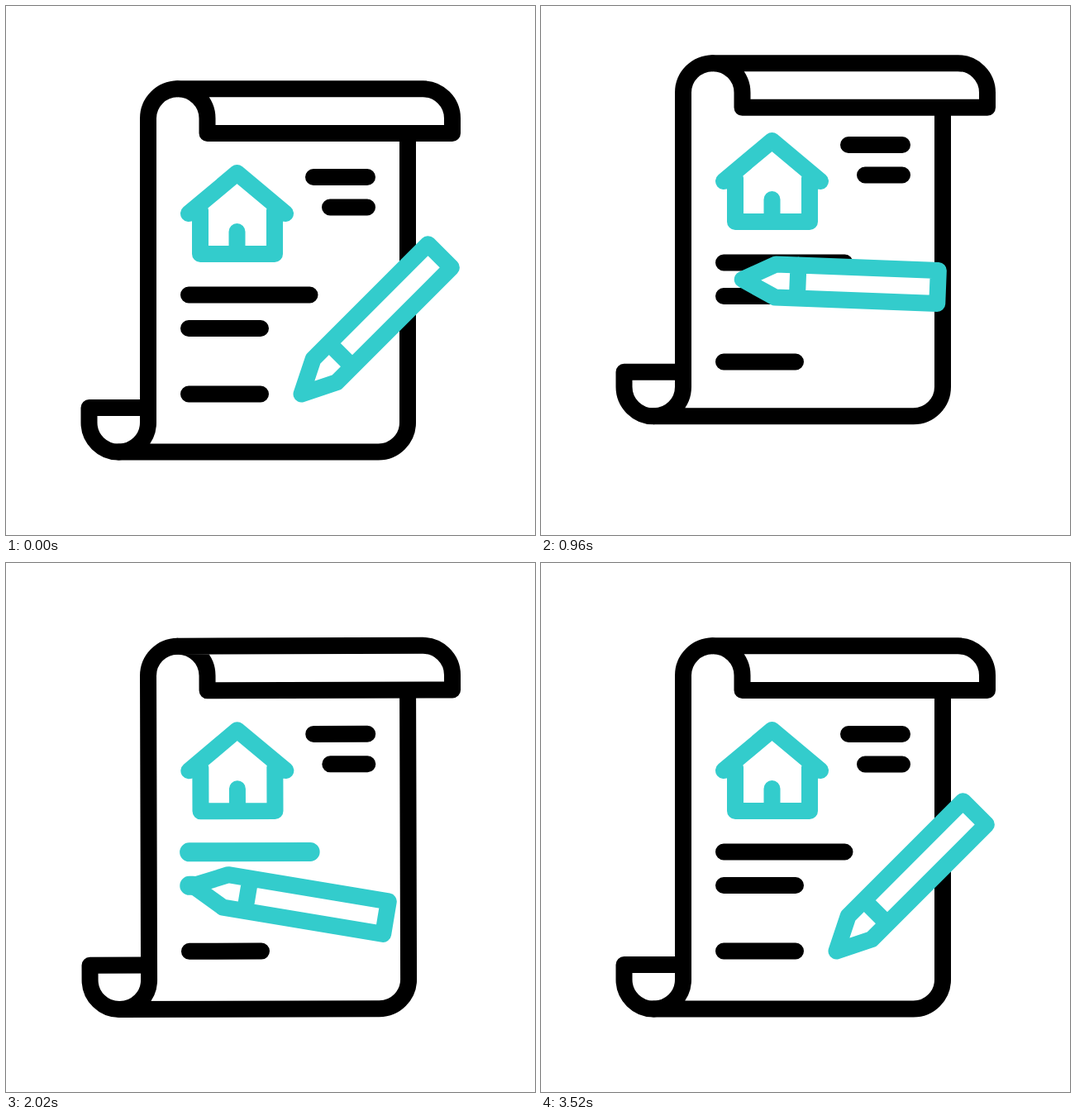
These frames come from a looping animation (640x640 px, 3.6 s). An HTML page:

```html
<!DOCTYPE html>
<html lang="en">
<head>
<meta charset="utf-8">
<title>House contract</title>
<style>
  html, body { margin: 0; width: 100%; height: 100%; overflow: hidden; background: #fff; }
  svg { display: block; width: 100%; height: 100%; }
  .ink, .teal { fill: none; stroke: #000; stroke-width: 20; stroke-linecap: round; stroke-linejoin: round; }
  .teal { stroke: #3cc; }
  .mark { stroke-width: 23; }
  .solid { fill: #fff; }
</style>
</head>
<body>
<svg viewBox="0 0 640 640">
  <g id="page">
    <path id="sheet" class="ink"/>
    <path id="curl" class="ink"/>
    <g id="content">
      <path class="teal" d="M235 247V300H325V247M221 251L279.5 202L338 251M279.5 273V300"/>
      <path class="ink" d="M372 207H437M392 243.5H437M221 349.5H367.5M221 390H308M221 469.5H308"/>
      <path class="teal mark"/>
      <path class="teal mark"/>
      <path class="teal mark"/>
    </g>
    <path id="roll" class="ink solid"
      d="M207.5 100.3A35.7 35.7 0 0 1 243.5 136V154H540V136A35.7 35.7 0 0 0 504 100.3Z"/>
    <path id="pencil" class="teal solid" d="M0 0L40 -20H236.5V20H40ZM67 -20V20"/>
  </g>
</svg>
<script>
const LOOP = 3600, STEP = 20, LEFT = 221;
const REST = { x: 357.5, y: 469.5, tilt: -45 };

// The pencil reaches each line at `from` and leaves it at `to`.
const lines = [
  { y: 349.5, end: 367.5, from: 1089, to: 1690, tilt: 14.4, leave: { x: 367.5, tilt: 20 }, ease: linear },
  { y: 390, end: 308, from: 2000, to: 2390, tilt: 11.3, leave: { x: 308, tilt: -21.5 }, ease: linear },
  { y: 469.5, end: 308, from: 2800, to: 3200, tilt: -23.4, leave: REST, ease: smooth }
];

const $ = id => document.getElementById(id);
const marks = document.querySelectorAll('.mark');

function linear(u) { return u; }
function smooth(u) { return u * u * (3 - 2 * u); }
function span(t, a, b, ease = smooth) {
  return ease(Math.min(1, Math.max(0, (t - a) / (b - a))));
}
const mix = (a, b, u) => a + (b - a) * u;

// Two full swings of the page while the first two lines are written.
function sway(t) {
  return 3 * Math.sin(4 * Math.PI * span(t, 1169, 2297, linear));
}

function pencilAt(t) {
  let { x, y, tilt } = REST;
  const wind = span(t, 220, 490);
  x -= wind;
  y += 1.5 * wind;
  tilt -= 13.2 * wind;
  let left = 593;
  for (const { y: row, from, to, tilt: lean, leave, ease } of lines) {
    const go = span(t, left, from), draw = span(t, from, to, ease);
    x = mix(mix(x, LEFT, go), leave.x, draw);
    y = mix(y, row, go);
    tilt = mix(mix(tilt, lean, go), leave.tilt, draw);
    left = to;
  }
  return { x, y, tilt };
}

function render(t) {
  const dy = 47 * span(t, 220, 495) - 80 * span(t, 505, 834) + 33 * span(t, 920, 1200);
  const rolled = 120 * (span(t, 220, 486) - span(t, 486, 1076));
  const shift = -0.65 * rolled;
  const base = 504 - rolled, foot = base + 35.5, lip = base - 18;

  $('page').setAttribute('transform', `rotate(${sway(t)} 343 130) translate(0 ${dy})`);
  $('sheet').setAttribute('d',
    `M207.5 100.3A35.7 35.7 0 0 0 172 136V${base}A35.5 35.5 0 0 1 136.5 ${foot}` +
    `H450.5A35.5 35.5 0 0 0 486 ${base}V154`);
  $('curl').setAttribute('d', `M172 ${lip}H100.5V${base}A35.5 35.5 0 0 0 136.5 ${foot}`);
  $('content').setAttribute('transform', `translate(0 ${shift})`);

  const { x, y, tilt } = pencilAt(t);
  $('pencil').setAttribute('transform', `translate(${x} ${y + shift}) rotate(${tilt})`);

  const gone = span(t, 3200, 3520);
  lines.forEach((line, i) => {
    const head = t < line.to ? Math.min(x, line.end) : line.end;
    const tail = mix(LEFT, line.end, gone);
    const on = t > line.from && gone < 1;
    marks[i].setAttribute('d', on ? `M${tail} ${line.y}H${Math.max(head, tail + 0.01)}` : '');
  });
}

const begin = performance.now();
function tick() {
  const t = (performance.now() - begin) % LOOP;
  render(Math.floor(t / STEP) * STEP);
  requestAnimationFrame(tick);
}
tick();
</script>
</body>
</html>
```
